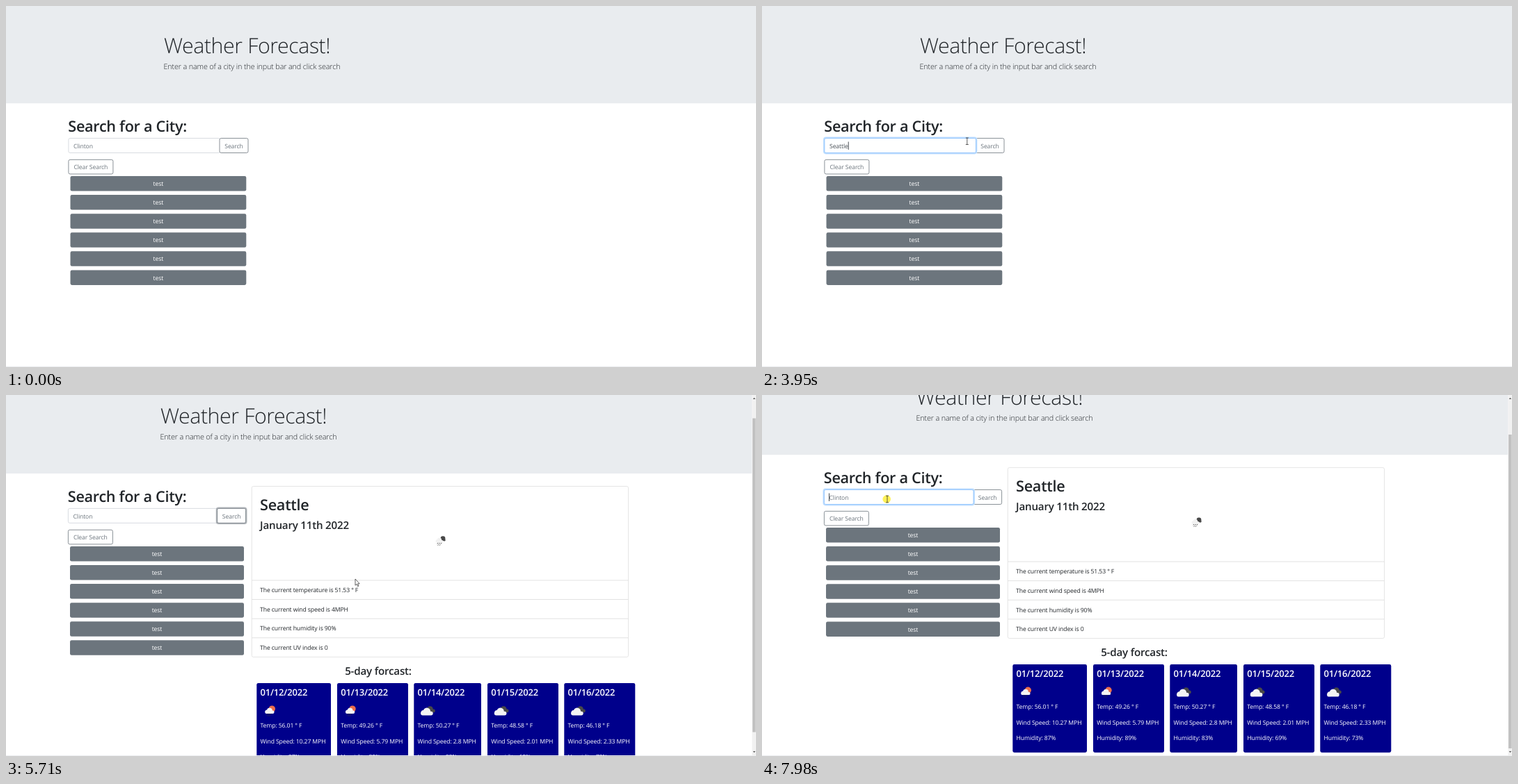
These frames come from a looping animation (1078 by 520 pixels, 8 s). An HTML page:

```html
<!DOCTYPE html>
<html lang="en">
<head>
<meta charset="utf-8">
<title>Weather Forecast</title>
<style>
html, body { margin: 0; width: 100%; height: 100%; overflow: hidden; background: #fff; }
svg { display: block; width: 1078px; height: 520px; }
text {
  font-family: "Open Sans", "Noto Sans", sans-serif;
  letter-spacing: -.014em;
  text-rendering: geometricPrecision;
  fill: #212529;
  white-space: pre;
}
.light { font-weight: 300; }
.bold { font-weight: 600; }
.mid { text-anchor: middle; }
.gray { fill: #6c757d; }
.typed { fill: #495057; }
.white { fill: #fff; }
</style>
</head>
<body>
<svg id="stage" viewBox="0 0 1078 520"></svg>
<script>
const stage = document.getElementById('stage');
const LOOP = 8000;
const CLICK = { field: 1080, search: 4220, again: 7840 };
const RESULT = 4360, LOADED = 4640;
const WORD = 'Seattle';
const KEYS = [1940, 2070, 2200, 2400, 2530, 2600, 2730];

// time, x, y of the pointer
const POINTER = [
  [0, 1050, 540], [125, 1036, 510], [420, 420, 440], [650, 21, 300], [865, 135, 201],
  [3500, 135, 201], [3800, 230, 180], [4010, 318, 200], [4285, 319, 199], [4600, 319, 199],
  [5028, 357, 230], [5290, 503, 264], [5390, 503, 264], [5425, 502, 265], [5699, 502, 265],
  [5833, 500, 269], [5890, 500, 269], [6370, 438, 461], [6800, 372, 300], [7000, 348, 186],
  [7205, 208, 166], [7550, 180, 150], [8000, 180, 150]
];
const SCROLL = [[0, 0], [5565, 0], [5632, 8], [5699, 27], [5766, 46], [5833, 54], [8000, 54]];

const DAYS = [
  { x: 360.3, w: 106.7, date: 12, temp: '56.01', wind: '10.27', hum: 87, sun: true },
  { x: 476, w: 102, date: 13, temp: '49.26', wind: '5.79', hum: 89, sun: true },
  { x: 586.3, w: 96.7, date: 14, temp: '50.27', wind: '2.8', hum: 83 },
  { x: 692, w: 102, date: 15, temp: '48.58', wind: '2.01', hum: 69 },
  { x: 802.3, w: 102, date: 16, temp: '46.18', wind: '2.33', hum: 73 }
];
const FACTS = ['temperature is 51.53 ° F', 'wind speed is 4MPH', 'humidity is 90%', 'UV index is 0'];

const FULL = { title: 227, left: 89.9, fieldW: 217.6, btn: 307, btnW: 41, bar: 92.5, barW: 252.8, card: 356.6, cardW: 541, mid: 540 };
const NARROW = { title: 222, left: 89.4, fieldW: 214.6, btn: 303.6, btnW: 41, bar: 92, barW: 250, card: 353.3, cardW: 541.2, mid: 535 };

const clamp = v => Math.max(0, Math.min(1, v));
const fade = (t, from) => clamp((t - from) / 150);

function track(keys, t) {
  let i = 1;
  while (i < keys.length - 1 && keys[i][0] < t) i++;
  const a = keys[i - 1], b = keys[i], k = clamp((t - a[0]) / (b[0] - a[0]));
  return a.slice(1).map((v, j) => v + (b[j + 1] - v) * k);
}

// the screen is refreshed about 15 times a second
const tick = t => 130 + Math.floor((t - 124) / 67.1) * 67.1;

const text = (x, y, size, str, cls = '') =>
  `<text x="${x}" y="${y}" font-size="${size * .965}" class="${cls}">${str}</text>`;
const box = (x, y, w, h, attrs) => `<rect x="${x}" y="${y}" width="${w}" height="${h}" ${attrs}/>`;
const line = (x, y, w) => box(x, y, w, .9, 'fill="#dfdfdf"');
const dot = (x, y, r, fill) => `<circle cx="${x}" cy="${y}" r="${r}" fill="${fill}"/>`;
const outline = (c, fill = '#fff') => `rx="2.2" fill="${fill}" stroke="${c}" stroke-width=".8"`;
const ring = (x, y, w, h, c) =>
  box(x - .9, y - .9, w + 1.8, h + 1.8, `rx="2.8" fill="none" stroke="${c}" stroke-width="2"`);

function cloud(x, y, s, fill) {
  return `<g transform="translate(${x} ${y}) scale(${s})" fill="${fill}">` +
    '<rect x="-9" y="-1" width="18" height="6" rx="3"/><circle cx="0" cy="-1" r="5.3"/><circle cx="-5" cy="1" r="3.6"/></g>';
}

function rain(x, y) {
  return `<path d="M${x} ${y}l-1 1.5m3.5-1.5l-1 1.5m3.5-1.5l-1 1.5m-3.5 1l-.7 1.3m3.2-1.3l-.7 1.3" stroke="#333" stroke-width=".9" fill="none"/>`;
}

function nowIcon(x, y) {
  return dot(x + 3, y - 3.2, 3.4, '#484848') + dot(x + 5, y - 1, 1.7, '#484848') +
    cloud(x - 2, y - .3, .6, '#f2f2f2') + rain(x - 4, y + 3);
}

function brokenIcon(x, y) {
  return `<g transform="translate(${x} ${y})"><path d="M.5.5h6l2 2v6h-8z" fill="#d3e2f8" stroke="#8a8f96" stroke-width=".8"/>` +
    '<path d="M1 8l3-3.5L6 6 4.5 8z" fill="#4c9a3c"/><path d="M8.8 4L4.8 8.8h4z" fill="#fff"/><circle cx="3" cy="3" r="1" fill="#fff"/></g>';
}

function dayCard({ x, w, date, temp, wind, hum, sun }) {
  const tx = x + 5.2;
  const icon = sun
    ? dot(x + 22, 479.2, 4.7, '#ec6e4c') + cloud(x + 18.6, 482.4, .74, '#f4f4f4') + rain(x + 16, 486)
    : cloud(x + 23.2, 480.4, .82, '#484848') + cloud(x + 18.6, 483.7, .98, '#f4f4f4');
  return box(x, 442, w, 127, 'rx="2.4" fill="#00008b"') +
    text(tx, 460.3, 13.48, `01/${date}/2022`, 'bold white') + icon +
    text(tx, 506, 8.98, `Temp: ${temp} ° F`, 'white') +
    text(tx, 528.6, 8.98, `Wind Speed: ${wind} MPH`, 'white') +
    text(tx, 551, 8.98, `Humidity: ${hum}%`, 'white');
}

function results(L, loaded) {
  const tx = L.card + 11.8;
  let s = box(L.card, 158.6, L.cardW, 245.9, outline('#dfdfdf')) +
    text(tx, 193, 22.46, WORD, 'bold') +
    text(tx, 220, 15.72, 'January 11th 2022', 'bold') +
    text(L.mid, 429.6, 15.72, '5-day forcast:', 'bold mid');
  if (loaded) {
    FACTS.forEach((f, i) => {
      const y = 293.6 + i * 27.6;
      s += line(L.card, y, L.cardW) + text(tx, y + 17.7, 8.98, 'The current ' + f);
    });
    return s + nowIcon(625, 237) + DAYS.map(dayCard).join('');
  }
  for (let i = 0; i < 4; i++) s += line(L.card, 347.6 + i * 14.1, L.cardW);
  return s + brokenIcon(607.4, 230.6) + text(616.6, 240.6, 8.98, 'wx icon');
}

function scrollbar(top) {
  return box(1072.4, 0, 5.6, 520, 'fill="#f1f1f1"') +
    box(1073, 10 + top * 47 / 54, 4.6, 452, 'fill="#c1c1c1"') +
    '<path d="M1073.6 6l1.8-2.2 1.8 2.2zM1073.6 513l1.8 2.2 1.8-2.2z" fill="#606060"/>';
}

const SHAPES = {
  arrow: '<path d="M0 0V9.2L2.1 7.3 3.6 10.7 5 10.1 3.6 6.8H6.2z" fill="#fff" stroke="#222" stroke-width=".7"/>',
  beam: '<path d="M-2-4.8H2M0-4.8V4.8M-2 4.8H2" fill="none" stroke="#333" stroke-width=".8"/>',
  hand: '<path d="M-1 1q0-1 .9-1t.9 1v3.6l3.2.7q1.2.3 1 1.5l-.5 3q-.2 1.4-.8 1.7h-3.6L-3.4 7q-.3-1 .6-1L-1 7.2z" fill="#fff" stroke="#222" stroke-width=".6"/>'
};

function frame(t) {
  const q = tick(t);
  const [px, py] = track(POINTER, q);
  const [top] = track(SCROLL, q);
  const wide = t >= RESULT, loaded = t >= LOADED;
  const L = loaded ? NARROW : FULL;
  const pageY = py + top;

  const inRow = pageY > 190 && pageY < 212;
  const onSearch = inRow && px > L.btn && px < L.btn + L.btnW;
  const onField = inRow && px > L.left && px <= L.btn;
  const focus = fade(q, CLICK.field - 40) - fade(q, CLICK.search - 20) + fade(q, CLICK.again - 40);
  const held = fade(q, CLICK.search - 20) - fade(q, CLICK.again - 40);
  const pressed = (t >= CLICK.field && t < 1280) || (t >= CLICK.search && t < 4560) || t >= CLICK.again;

  const typed = wide ? '' : WORD.slice(0, KEYS.filter(k => k <= t).length);
  const last = t >= CLICK.again ? CLICK.again : Math.max(CLICK.field, ...KEYS.filter(k => k <= t));
  const active = t >= CLICK.field && t < CLICK.search || t >= CLICK.again;
  const caret = active && (t - last) % 1060 < 530;

  const fx = L.left + 7.1;
  let s = box(0, -1, loaded ? 1072.4 : 1078, 141.2, 'fill="#e9ecef"') +
    text(L.title, 67.6, 31.44, 'Weather Forecast!', 'light') +
    text(L.title - .6, 91.3, 11.23, 'Enter a name of a city in the input bar and click search', 'light') +
    text(L.left - .6, 181, 22.46, 'Search for a City:', 'bold');

  const field = [L.left, 190.5, L.fieldW, 21];
  const btn = [L.btn, 190.5, L.btnW, 21];
  s += box(...field, outline('#ced4da')) +
    box(...btn, outline('#6c757d', onSearch ? '#6c757d' : '#fff')) +
    text(L.btn + L.btnW / 2, 204.6, 8.98, 'Search', 'mid ' + (onSearch ? 'white' : 'gray'));
  if (held > 0) s += `<g opacity="${held}">${ring(...btn, '#6c757d80')}</g>`;
  if (focus > 0) s += `<g opacity="${focus}">${ring(...field, '#bfdeff') + box(...field, outline('#80bdff'))}</g>`;
  s += `<g id="entry">${typed ? text(fx, 204.8, 8.98, typed, 'typed') : text(fx, 204.8, 8.98, 'Clinton', 'gray')}</g>`;
  if (caret) s += box(fx - .5, 195.5, .9, 11.5, 'id="caret" fill="#343a40"');

  s += box(L.left, 221.4, 64, 20.6, outline('#6c757d')) +
    text(L.left + 32, 235, 8.98, 'Clear Search', 'mid gray');
  for (let i = 0; i < 6; i++) {
    const y = 245.05 + i * 27.07;
    s += box(L.bar, y, L.barW, 21.5, 'rx="2.3" fill="#6c757d"') +
      text(L.bar + L.barW / 2, y + 14.1, 8.98, 'test', 'mid white');
  }
  if (wide) s += results(L, loaded);

  const shape = onSearch ? 'hand' : onField ? 'beam' : 'arrow';
  const html = `<g transform="translate(0 ${-top})">${s}</g>` +
    (loaded ? scrollbar(top) : '') +
    box(0, 519, 1078, 1, 'fill="#eceef0"') +
    `<g transform="translate(${px} ${py})">` +
    (pressed ? '<circle cx="-.8" r="5.8" fill="#ffee22" opacity=".75"/>' : '') + SHAPES[shape] + '</g>';
  return { html, typed, fx };
}

let shown = '';
function draw() {
  const { html, typed, fx } = frame(performance.now() % LOOP);
  const key = html + typed;
  if (key !== shown) {
    shown = key;
    stage.innerHTML = html;
    const caret = document.getElementById('caret');
    if (caret && typed) {
      const width = document.querySelector('#entry text').getComputedTextLength();
      caret.setAttribute('x', fx + width);
    }
  }
  requestAnimationFrame(draw);
}
draw();
</script>
</body>
</html>
```
